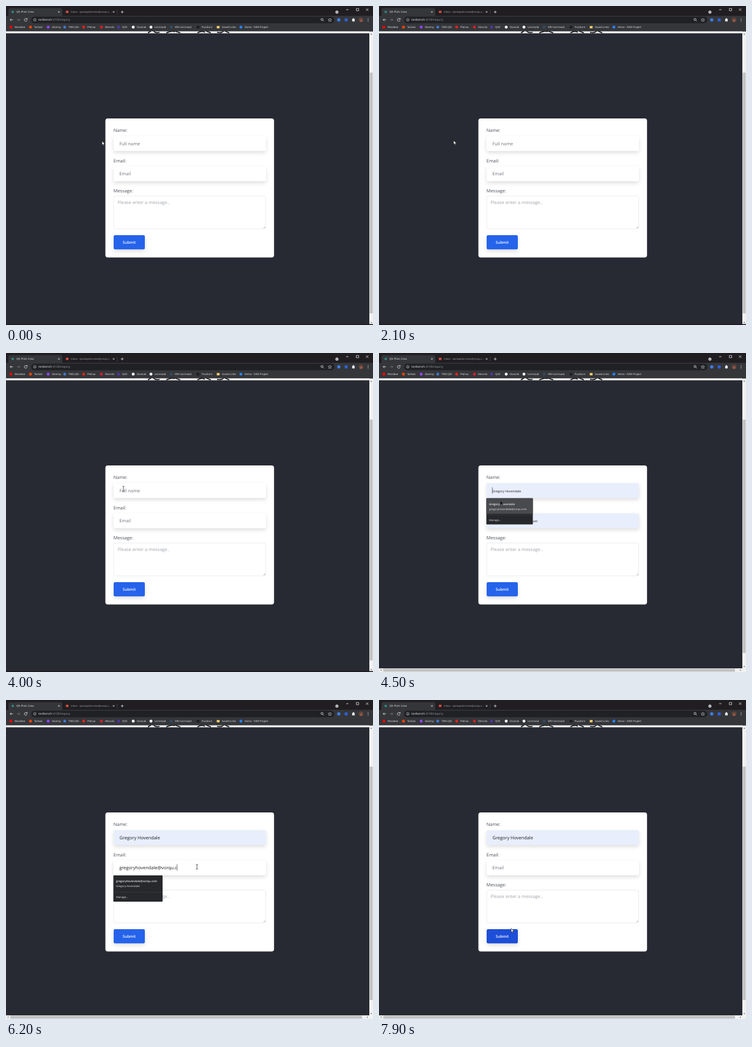
An HTML page that plays this animation: 600 px wide and 522 px high, repeating every 8000 ms.

```html
<!DOCTYPE html>
<html lang="en">
<head>
<meta charset="utf-8">
<title>Contact form</title>
<style>
  html, body { margin: 0; width: 100%; height: 100%; overflow: hidden; background: #282a33; }
  svg { display: block; width: 600px; height: 522px; }
  text { font-family: "Open Sans", "Noto Sans", sans-serif; font-size: 7.4px; text-rendering: geometricPrecision; white-space: pre; }
  .label { fill: #4b5058; }
  .field { fill: #fff; filter: drop-shadow(0 3px 3px rgba(0,0,0,.13)); }
  .line { fill: none; stroke: #dfe1e5; stroke-width: .8; }
  #bar text, .popup text { font-size: 4.3px; fill: #e8eaed; }
  .popup text.strong { font-size: 4.55px; font-weight: 600; }
</style>
</head>
<body>
<svg viewBox="0 0 600 522">
  <g id="page">
    <rect y="41" width="594" height="3.6" fill="#fff"/>
    <path d="M232 44l5-3M241 41q4 4 10 2M262 44q8-4 14-2M276 41l9 3M313 44q7-4 12-1M327 41l8 3M345 43q7 2 11-2M358 41l7 3" fill="none" stroke="#111" stroke-width="1.7"/>
    <rect x="162.5" y="184" width="275.7" height="227.4" rx="4" fill="#fff"/>
    <text class="label" x="175.8" y="206.2">Name:</text>
    <text class="label" x="175.8" y="255.8">Email:</text>
    <text class="label" x="175.8" y="305">Message:</text>
    <rect id="nameBox" class="field" x="176" y="213" width="249" height="24.2" rx="2"/>
    <rect id="emailBox" class="field" x="176" y="262.5" width="249" height="24.2" rx="2"/>
    <rect x="176" y="311" width="248.6" height="53.8" rx="2.4" fill="#fff" stroke="#e4e5ea" stroke-width=".7"/>
    <text x="182.5" y="324" fill="#a0a4ab">Please enter a message..</text>
    <path d="M421 363.5l2.7-2.7M422.6 363.6l1.2-1.2" stroke="#666" stroke-width=".5"/>
    <rect id="button" class="field" x="176" y="375" width="51" height="23.3" rx="2.3"/>
    <text x="201.5" y="389" text-anchor="middle" fill="#fff" style="font-size:6.2px;font-weight:600">Submit</text>
    <rect id="mark" x="185.2" y="268" height="12" fill="#3b7ddd"/>
    <text id="name" x="185.5"/>
    <text id="email" x="185.2"/>
    <path id="caret" stroke="#222" stroke-width=".6"/>
  </g>
  <g id="scroll"></g>
  <g id="bar"></g>
  <g id="popup" class="popup"></g>
  <path id="arrow" d="M0 0V6.6L1.6 5.2L2.7 7.6L3.7 7.1L2.7 4.8H4.7Z" stroke-width=".6"/>
  <path id="beam" d="M-1.6-4Q0-4 0-3Q0-4 1.6-4M0-3V3M-1.6 4Q0 4 0 3Q0 4 1.6 4" fill="none" stroke="#333" stroke-width=".8"/>
</svg>
<script>
const LOOP = 8000, STEP = 100;
const NAME = "Gregory Hovendale", EMAIL = "gregoryhovendale@vorqu.com";
const $ = id => document.getElementById(id);
const set = (id, attrs) => { for (const k in attrs) $(id).setAttribute(k, attrs[k]); };
const show = (id, on) => $(id).style.display = on ? "" : "none";
const rect = (x, y, w, h, fill, rx = 0) =>
  `<rect x="${x}" y="${y}" width="${w}" height="${h}" rx="${rx}" fill="${fill}"/>`;
const dot = (x, y, r, fill) => `<circle cx="${x}" cy="${y}" r="${r}" fill="${fill}"/>`;
const line = (d, style = "") => `<path class="line" d="${d}" style="${style}"/>`;
const label = (x, y, text, style = "", cls = "") =>
  `<text x="${x}" y="${y}" class="${cls}" style="${style}">${text}</text>`;
const cross = (x, y, r) => line(`M${x - r} ${y - r}l${2 * r} ${2 * r}m0 ${-2 * r}l${-2 * r} ${2 * r}`);

const bookmarks = [
  [8, "Wovibee", "#f00"], [40, "Tarbok", "#ff4500"], [69, "Glomsy", "#9146ff"],
  [96, "TWO.QN", "#3f78d0"], [127, "Plenva", "#e2231a"], [156, "Morvilo", "#d81f26"],
  [184, "QVX", "#5035a8"], [208, "Dovnak", "#fff"], [237, "Lernroad", "#fff"],
  [270, "XRV Lernroad", "#2f4d68"], [314, "Puzzlorn", "#1c1c1e"],
  [347, "Saved Links", ""], [384, "Vemo - SWE Project", "#2684ff"]
];

function drawBrowser() {
  $("bar").innerHTML =
    rect(0, 0, 600, 41.5, "#35363a") + rect(0, 0, 600, 16, "#201e21") +
    rect(4, 3.5, 88, 14, "#35363a", 3) +
    dot(11, 9.7, 1.9, "#2f8f86") + label(17, 11.3, "QN Plots Crew") + cross(86.5, 9.7, 1.3) +
    rect(97.8, 7.8, 4.4, 3.6, "#d94b40") +
    label(106, 11.3, "Inbox - qnrowplotscrew@vorqu.c...", "fill:#a4a6aa;font-size:4.1px") +
    cross(176, 9.7, 1.3) + line("M181.8 6v8", "stroke:#55575b;stroke-width:.5") +
    line("M190 7.5v4.6M187.7 9.8h4.6") +
    dot(541, 10, 2.5, "#d0d2d5") + line("M539.9 9.5l1.1 1.2l1.1-1.2", "stroke:#222") +
    line("M556 6h4M572.8 4h3.8v3.8h-3.8z") + cross(590.5, 6, 1.9) +
    line("M11.4 22.6h-4.6m2-2l-2 2l2 2") +
    line("M18 22.6h4.6m-2-2l2 2l-2 2", "stroke:#77797e") +
    line("M34.2 21.4a2.3 2.3 0 1 0 .3 1.9M34.7 19.8v2h-2") +
    rect(41, 17.4, 496, 10.8, "#202124", 5.4) +
    line("M49.2 22.6a2.1 2.1 0 1 0-4.2 0a2.1 2.1 0 1 0 4.2 0M47.1 22.3v1.4", "stroke-width:.6") +
    label(53, 24.3, 'testbench<tspan fill="#9aa0a6">:4100/inquiry</tspan>', "font-size:4.8px") +
    line("M518.3 22a1.7 1.7 0 1 0-3.4 0a1.7 1.7 0 1 0 3.4 0M517.9 23.3l1.8 1.8") +
    line("M529.5 20l.8 1.8 2 .2-1.5 1.3.5 2-1.8-1.1-1.8 1.1.5-2-1.5-1.3 2-.2z", "stroke-width:.6") +
    dot(544, 22.7, 2.6, "#3f7ee8") + rect(553.7, 20.2, 4.8, 5, "#2b62d6", 1) +
    rect(565.9, 21, 4.2, 4.2, "#e8eaed", .6) + dot(568, 20.8, 1, "#e8eaed") +
    dot(580.4, 22.6, 3.9, "#60453b") + dot(580.6, 24, 2, "#9d5948") +
    [20.6, 22.6, 24.6].map(y => dot(592, y, .6, "#e8eaed")).join("") +
    bookmarks.map(([x, text, color]) =>
      (color ? dot(x, 34.6, 2.4, color) : rect(x - 2.4, 32.7, 4.6, 3.9, "#f5d26d", .5)) +
      label(x + 6, 36.2, text)).join("");
}

function drawScrollbars(wide) {
  const bottom = wide ? 516 : 521;
  $("scroll").innerHTML =
    rect(594, 41.5, 6, bottom - 41.5, "#f1f1f1") +
    rect(594.6, 109, 4.8, (wide ? 491 : 503) - 109, "#c1c1c1") +
    `<path d="M595.8 47l1.3-1.7l1.3 1.7zM595.8 ${bottom - 3.5}h2.6l-1.3 1.7z" fill="#555"/>` +
    (wide
      ? rect(0, 516, 600, 6, "#f1f1f1") + rect(7, 516.6, 575, 4.8, "#c1c1c1") +
        '<path d="M4 517.7v2.6l-1.6-1.3zM590 517.7v2.6l1.6-1.3z" fill="#555"/>'
      : rect(0, 520.5, 600, 1.5, "#1d1821"));
}

function drawPopup(x, y, w, first, second, hover, clear) {
  const rule = dy => line(`M${x} ${y + dy}h${w}`, "stroke:#55565a;stroke-width:.5;stroke-dasharray:1 .6");
  const h = clear ? 58 : 43;
  $("popup").innerHTML =
    rect(x, y, w, h, "#27282b", 1) +
    (hover ? rect(x, y + .5, w, 25, "#494a4e") : "") +
    label(x + 4.5, y + 11, first, "", "strong") + label(x + 4.5, y + 19.2, second) +
    rule(27.5) + (clear ? label(x + 4.5, y + 37, "Clear form") + rule(43) : "") +
    label(x + 4.5, y + h - 5.8, "Manage...");
}

function field(id, value, hint, baseline, preview) {
  $(id).textContent = value || hint;
  set(id, { y: baseline, fill: value ? "#1b1d22" : "#70757d" });
  $(id).style.fontSize = preview ? "5.2px" : "7.4px";
}

// time, x, y of the pointer
const path = [
  [0, 157, 221], [700, 205, 226], [1100, 205, 226], [1700, 122, 220], [2400, 122, 220],
  [3000, 150, 214], [3800, 192, 222], [4200, 192, 222], [4500, 198.5, 242], [4700, 198.5, 244],
  [5000, 205, 272], [5200, 200, 273], [5600, 122, 266], [5700, 122, 266], [5900, 300, 273],
  [6800, 347, 273], [7000, 330, 273], [7300, 110, 286], [7700, 134, 392], [7900, 216, 373.6], [8000, 216, 373.6]
];

function pointerAt(t) {
  const i = path.findIndex(p => p[0] > t);
  const [t0, x0, y0] = path[i - 1], [t1, x1, y1] = path[i];
  const p = (t - t0) / (t1 - t0), k = p * p * (3 - 2 * p);
  return [x0 + (x1 - x0) * k, y0 + (y1 - y0) * k];
}

function render(t) {
  const within = (a, b) => t >= a && t < b;
  const [x, y] = pointerAt(t);
  const preview = within(4400, 4700), filled = t >= 4400;
  const cut = Math.max(0, Math.min(3, (t - 6000) / STEP));
  const email = filled && t < 6900 ? EMAIL.slice(0, EMAIL.length - cut) : "";
  const selected = within(6600, 6900);

  field("name", filled ? NAME : "", "Full name", 227.8, preview);
  field("email", email, "Email", 277, preview);
  set("nameBox", { fill: "#fff", style: filled ? "fill:#e8eefb" : "" });
  set("emailBox", { style: filled && !cut ? "fill:#e8eefb" : "" });
  set("button", { style: `fill:${x > 176 && x < 227 && y > 373 && y < 398 ? "#1d4ed8" : "#2563eb"}` });

  const width = email ? $("email").getComputedTextLength() : 0;
  show("mark", selected);
  set("mark", { width });
  if (selected) set("email", { fill: "#fff" });

  const inName = within(1000, 2100) || within(4300, 5000), inEmail = within(5100, 7300);
  show("caret", (inName || inEmail) && !selected);
  set("caret", { d: `M${185.3 + (t >= 6000 ? width : 0)} ${inName ? 219.8 : 268.5}v10.5` });

  const namePopup = within(1000, 2100) || within(4300, 4700);
  show("popup", namePopup || inEmail);
  if (namePopup) drawPopup(175.5, 237.6, 76, NAME, EMAIL, preview, false);
  else if (inEmail) drawPopup(175.5, 287, 80.5, EMAIL, NAME, false, !cut);
  drawScrollbars(t >= 4300);

  const overName = y > 213 && y < 237.5, overEmail = y > 262 && y < 287;
  const beam = x > 176 && x < 425 && (overName || overEmail);
  const dark = within(4300, 6000);
  show("beam", beam);
  show("arrow", !beam);
  set("beam", { transform: `translate(${x} ${y})` });
  set("arrow", {
    transform: `translate(${x} ${y})`,
    fill: dark ? "#0b0b0d" : "#fff",
    stroke: dark ? "#4a4b50" : "#111"
  });
}

function tick(now) {
  render(Math.floor(now % LOOP / STEP) * STEP);
  requestAnimationFrame(tick);
}
drawBrowser();
render(0);
requestAnimationFrame(tick);
</script>
</body>
</html>
```
